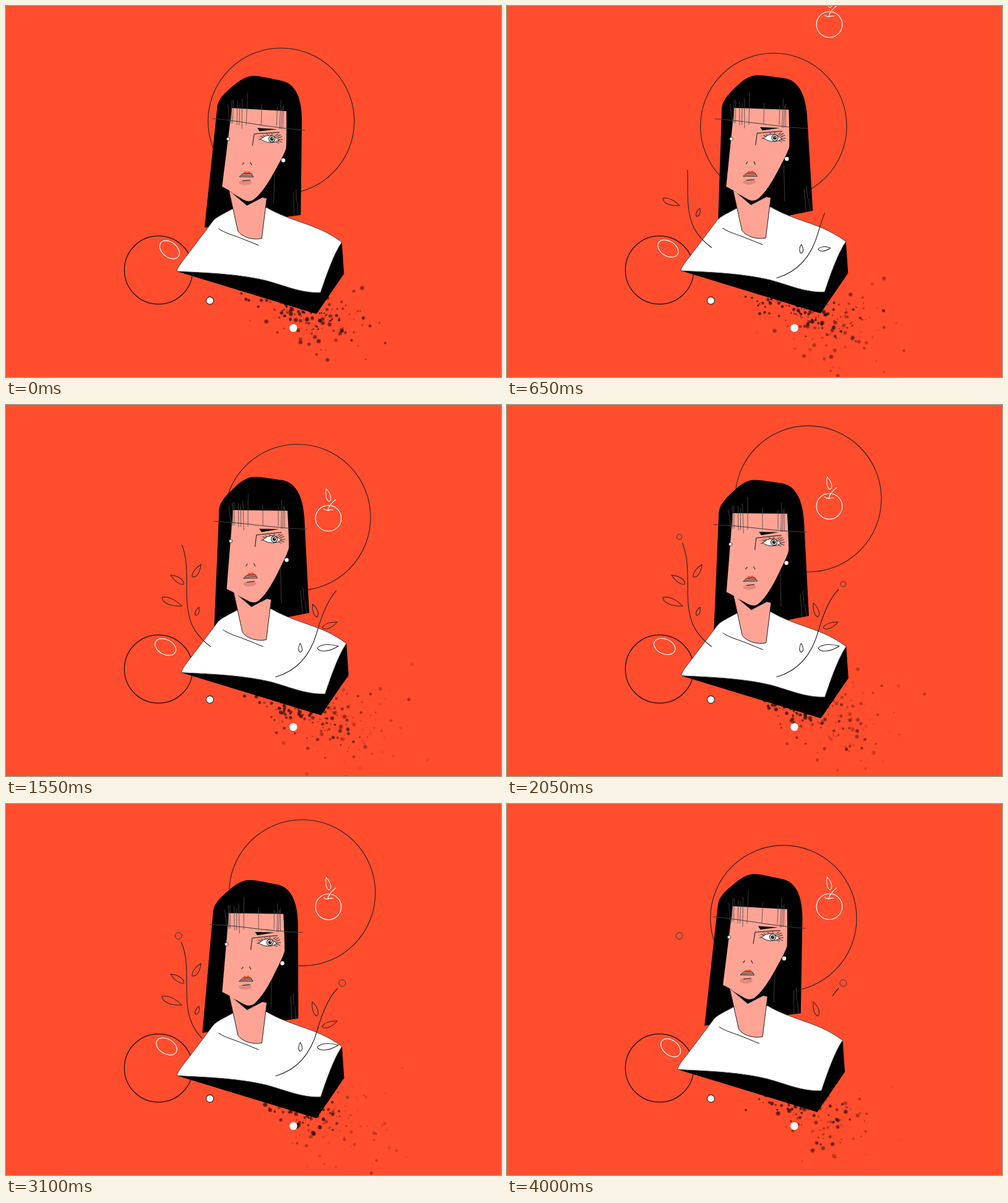
An HTML page with a canvas that plays this animation: 800x600 px, repeating every 4.05 s.

```html
<!DOCTYPE html>
<html lang="en">
<head>
<meta charset="utf-8">
<title>Portrait</title>
<style>
html, body { margin: 0; width: 100%; height: 100%; overflow: hidden; background: #ff4d2e; }
canvas { display: block; width: 800px; height: 600px; }
</style>
</head>
<body>
<canvas id="stage" width="800" height="600"></canvas>
<script>
const ctx = document.getElementById('stage').getContext('2d');
const LOOP = 4050, STEP = 50, TAU = Math.PI * 2;
const BG = '#ff4d2e', SKIN = '#ffa495', INK = '#111', LINE = '#222', GREY = '#4a4a4a';
const { sin, cos, exp, min, max } = Math;
const clamp = u => min(1, max(0, u));
const easeOut = u => 1 - (1 - clamp(u)) ** 2;

// Seamless motion: a slow wave over the loop plus one at double speed
const sway = (mean, c1, s1, c2, s2) => t => {
  const a = TAU * t / LOOP;
  return mean + c1 * cos(a) + s1 * sin(a) + c2 * cos(2 * a) + s2 * sin(2 * a);
};
const bustX = sway(3.6, -2.8, 3.3, -.5, .15);
const bustY = sway(4.9, -4.2, -5.35, -.7, .7);
const headTilt = sway(-1.86, 1.3, .16, .5, -.08);
const hairSwing = sway(-.6, .5, -1.8, .1, -1.1);
const haloX = sway(463.3, -20.9, -18.9, 2.3, -4.8);
const haloY = sway(168.9, 16.4, 27.3, .9, -6.6);
const shineTurn = sway(20.1, 7.8, .3, .6, -2.9);

// One-way motion
const appleY = t => 166 - 221 * exp((500 - t) / 420) * cos((t - 500) * .0033);
const eyeOpen = t => 1 - exp(-(((t - 1190) / 100) ** 2));
const stemGrow = t => min(1, 1.02 * (1 - exp(-t / 475)));
const stemCut = (t, from) => clamp((t - from) / 980);
const leafSize = (t, stage) =>
  easeOut((t - 200 - 500 * stage) / 500) * (1 - easeOut((t - 3150 - 450 * Math.round(stage)) / 250));
const ringSize = t => 5.4 * easeOut((t - 1700) / 650);

function paint(d, fill, stroke, width = 1) {
  const p = typeof d === 'string' ? new Path2D(d) : d;
  if (fill) { ctx.fillStyle = fill; ctx.fill(p); }
  if (stroke) { ctx.strokeStyle = stroke; ctx.lineWidth = width; ctx.stroke(p); }
}

function oval(x, y, rx, ry, turn, fill, stroke, width) {
  const p = new Path2D();
  p.ellipse(x, y, rx, ry, turn, 0, TAU);
  paint(p, fill, stroke, width);
}

const disc = (x, y, r, ...style) => oval(x, y, r, r, 0, ...style);

function moved(x, y, draw) {
  ctx.save();
  ctx.translate(x, y);
  draw();
  ctx.restore();
}

function turned(deg, x, y, draw) {
  ctx.save();
  ctx.translate(x, y);
  ctx.rotate(deg * TAU / 360);
  ctx.translate(-x, -y);
  draw();
  ctx.restore();
}

// Dust drifts out from under the bust, then fades
let seed = 29;
const rnd = () => (seed = seed * 16807 % 2147483647) / 2147483647;
const bell = () => rnd() + rnd() + rnd() - 1.5;
const dust = Array.from({ length: 360 }, (_, i) => {
  const x = 448 + bell() * 74;
  const angle = .27 + bell() * .85, speed = .026 + rnd() * .032;
  return {
    x, y: 423 + (x - 275) * .306 + rnd() * 20,
    vx: cos(angle) * speed, vy: sin(angle) * speed,
    r: .7 + rnd() ** 1.3 * 2.4,
    born: i < 180 ? -2000 * rnd() : LOOP * rnd(),
    life: 2700 + rnd() * 1100
  };
});

function drawDust(t) {
  for (const p of dust) {
    const age = t - p.born;
    if (age < 0 || age > p.life) continue;
    const x = p.x + p.vx * age, y = p.y + p.vy * age;
    ctx.globalAlpha = .5 * min(1, 1.25 * (1 - age / p.life));
    disc(x, y, p.r * 1.2, '#1c0905');
    disc(x, y, p.r * .8, '#1c0905');
  }
  ctx.globalAlpha = 1;
}

// Portrait
function drawHair() {
  paint('M320.5 358.5L341 166C342 152 349 143 374 123.5C386 115 393 112.8 402 113C414 113.5 430 118 446 121C464 125 478 143 478 184L476 338Z', '#000');
  paint('M434.5 261L432 320M464.5 301L465 339M468.5 297L469 317M470.5 318L472 338', null, GREY, .8);
}

function drawBust() {
  paint('M275.5 429L501.5 498L546 433L542.5 382L420 380Z', '#000');
  paint('M275.5 429C278 420 286 412 297 397L331 352C338 342 342 341 366 328L421 326C440 337 455 342 480 351C510 361 526 370 542.5 382C530 400 519 431 508 463.5C478 465 450 452 420 444C370 432 308 431 275.5 429Z', '#fff', GREY);
  paint('M343 360C350 365 361 369 373 373L408 387', null, INK);
  paint('M360 298L366 303L389 322.5L414 309.5L421 311L413 376C398 379 382 374 374.5 364Z', SKIN, LINE);
}

function drawEye(open) {
  paint('M404 211Q424 203 446 209L441 216L411 215Z', 'rgba(215,120,110,.35)');
  const eye = new Path2D(`M411 215.5Q426 ${221 - 19 * open} 441 217Q427 226 411 215.5Z`);
  paint(eye, '#fff');
  ctx.save();
  ctx.clip(eye);
  disc(429.5, 215, 5, '#fff', INK, 1.1);
  disc(429.5, 215, 2.9, INK);
  disc(430.3, 214.2, .9, '#ddd');
  ctx.restore();
  paint(eye, null, INK, .9);
  moved(0, 5 * (1 - open), () =>
    paint('M408 216L412 215M416 212.5L411 210.5M418 211L415 208.5M424 209.5L421 206.5M430 209L429.5 206M435 210L440 206.5M437 211.5L444 208M439 213.5L446 211.5', null, INK, .8));
  paint('M440 216.5L447 216M439 218L446 220.5M436 220L441 222', null, INK, .8);
}

function drawFace(open) {
  paint('M365 165L453 170Q453.3 215 452.5 230C449 241 441 254 434 267C424 285 413 303 400 313Q393 318 385 314L366 303L360 298L349 292Z', SKIN);
  drawEye(open);
  paint('M406 197.3L438 199.2L409.5 202.6Z', '#000');
  paint('M398 226L401 207Q425 205 442 204.5M381.5 256.5L384.5 253M394.5 252.5L397 257.5', null, INK);
  oval(386.5, 285.5, 10.5, 4.3, 0, '#de8b7e');
  paint('M382.5 271.5L386 267.3L389 268.5L392 267L397 271.7Z', BG);
  paint('M377 276L382 271.5H396.5L399.5 276.5ZM380 274H398', '#f3a99b', INK, .9);
  paint('M382 282.7L395 281.7', null, INK, .9);
  paint('M358.5 159L361 190M365 152L363.5 190M367.5 152L366 190M374 154L373 193M378 157L376.5 193M381.5 150L381 198.5M390.5 140L388 193M413.5 158L412 193M438.5 163L437 194M444.5 152L441.5 199M446.5 163L444 199M448.5 161L447 198', null, GREY, .8);
  paint('M333 182C385 186 425 197 483 201', null, '#3c3c3c');
  disc(359, 215, 2.7, '#fff', '#333', .9);
  disc(448, 249.5, 3.2, '#fff');
}

function drawPortrait(t) {
  const onHead = draw => turned(headTilt(t), 390, 295, draw);
  moved(bustX(t), bustY(t), () => {
    onHead(() => turned(hairSwing(t), 405, 95, drawHair));
    drawBust();
    onHead(() => drawFace(eyeOpen(t)));
  });
}

// Plants
function makeStem(d, cutFrom) {
  const el = document.createElementNS('http://www.w3.org/2000/svg', 'path');
  el.setAttribute('d', d);
  return { path: new Path2D(d), length: el.getTotalLength(), cutFrom };
}
const stems = [
  makeStem('M331 391C300 368 292 345 292 300C292 270 293 245 283 223', 3000),
  makeStem('M435.5 440C470 430 492 406 503 366C511 338 521 313 536 298', 3110)
];

// base, tip, stage of growth
const leaves = [
  [306, 340, 312, 327, 0],
  [475, 400, 475.5, 385.5, 0],
  [252, 311, 284, 325, .3],
  [503, 393, 537, 390, .55],
  [287, 290, 266, 275, 1],
  [511, 360, 535, 351, 1],
  [301, 278, 315, 258, 1.4],
  [502, 343, 495, 320, 2]
];

function drawLeaf(bx, by, tx, ty, size, color = LINE) {
  if (size < .02) return;
  const l = Math.hypot(tx - bx, ty - by) * size, w = .07 * l + .9;
  moved(bx, by, () => {
    ctx.rotate(Math.atan2(ty - by, tx - bx));
    paint(`M0 0C${l * .1} ${w * 2.6} ${l * .6} ${w * 2.2} ${l} 0C${l * .65} ${-w * 1.5} ${l * .2} ${-w * 1.8} 0 0Z`, null, color);
  });
}

function drawPlants(t) {
  for (const { path, length, cutFrom } of stems) {
    const from = stemCut(t, cutFrom) * length, shown = stemGrow(t) * length - from;
    if (shown < .5) continue;
    ctx.setLineDash([shown, 2 * length]);
    ctx.lineDashOffset = -from;
    paint(path, null, LINE, 1.1);
    ctx.setLineDash([]);
  }
  for (const [bx, by, tx, ty, stage] of leaves) drawLeaf(bx, by, tx, ty, leafSize(t, stage));
  const r = ringSize(t);
  if (r > 0) {
    disc(278.7, 213.3, r, null, '#333');
    disc(543.4, 289.6, r, null, '#333');
  }
}

function drawApple() {
  disc(0, 0, 20.8, null, '#fff', 1.2);
  paint('M-1 -12.5C0 -20 5 -25 12 -30.5M-8 -15.5Q-5 -12.5 -1 -12.5Q4 -14.5 7.5 -13.5', null, '#fff', 1.2);
  drawLeaf(1, -27, -3.5, -47.5, 1, '#fff');
}

function draw(t) {
  ctx.fillStyle = BG;
  ctx.fillRect(0, 0, 800, 600);
  disc(haloX(t), haloY(t), 118.2, null, LINE, 1.1);
  disc(246.5, 427, 55.2, null, INK, 1.2);
  turned(shineTurn(t), 246.5, 427, () => oval(246.5, 389.6, 18, 12, .18, null, '#fff', 1.2));
  drawDust(t);
  drawPortrait(t);
  disc(329.5, 476.4, 6, '#fff', LINE, 1.1);
  disc(464.4, 520.8, 6.3, '#fff');
  drawPlants(t);
  if (t >= 500) moved(521, appleY(t), drawApple);
}

const start = performance.now();
function tick() {
  const t = max(0, performance.now() - start) % LOOP;
  draw(Math.floor(t / STEP) * STEP);
  requestAnimationFrame(tick);
}
tick();
</script>
</body>
</html>
```
